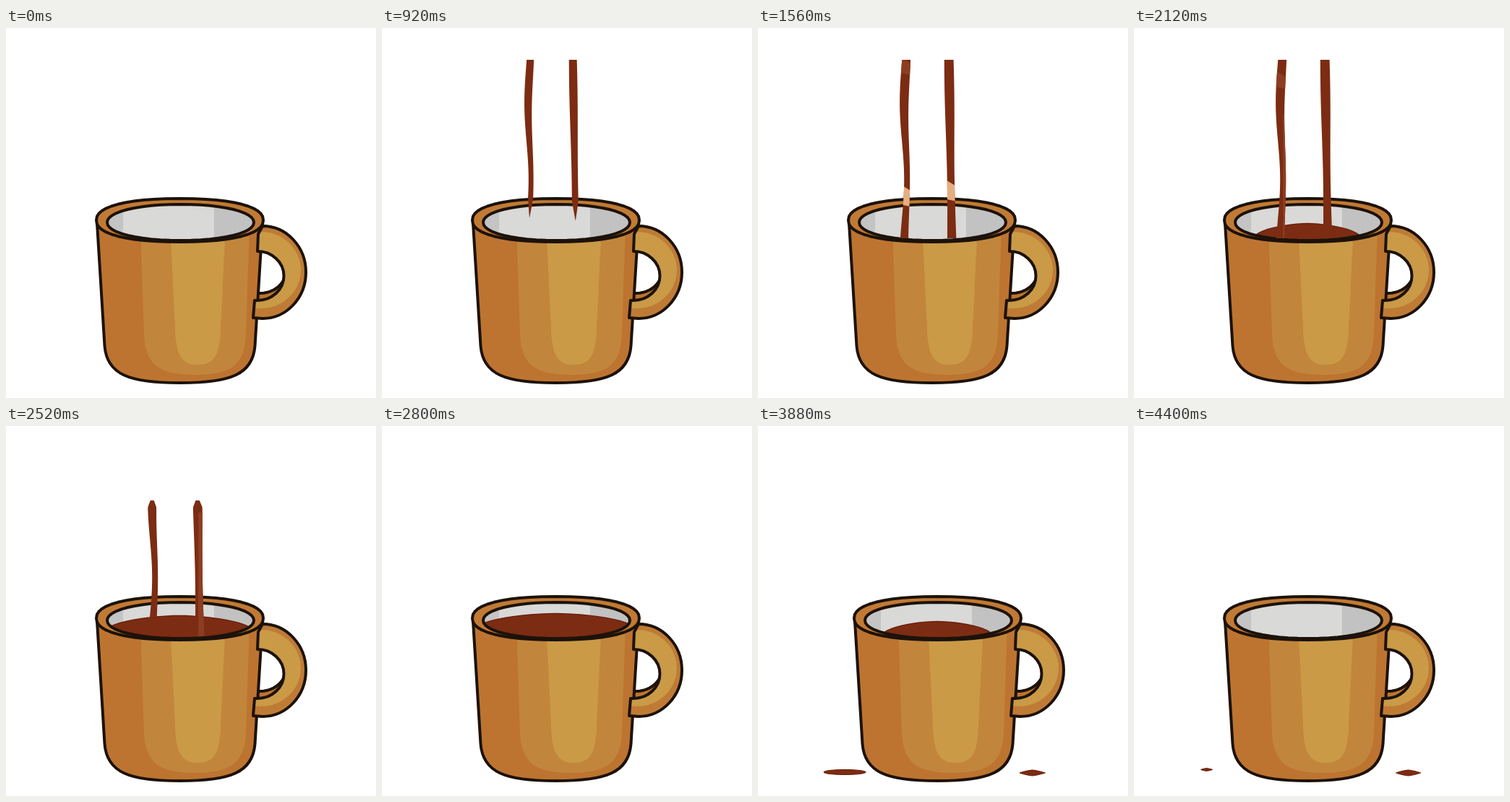
Recreate the animation shown at these times as an HTML page with a canvas. Size 512 by 512 pixels, loop 4840 ms.

```html
<!DOCTYPE html>
<html lang="en">
<head>
<meta charset="utf-8">
<title>Coffee mug</title>
<style>
html, body { margin: 0; width: 100%; height: 100%; overflow: hidden; background: #fff; }
canvas { display: block; width: 100vw; height: 100vh; }
</style>
</head>
<body>
<canvas width="512" height="512"></canvas>
<script>
const LOOP = 4840;
const ctx = document.querySelector('canvas').getContext('2d');
const INK = '#1c120a', DARK = '#bd7430', MID = '#c2853c', LIGHT = '#ca9a47';
const COFFEE = '#7c2c12', COFFEE_EDGE = '#691c0a', COFFEE_LIT = '#8c3e22', GLEAM = '#e6ae80';
const POUR_TOP = 44, POUR_END = 291;

// Superellipse: n = 1 is a diamond, 2 an ellipse, more is boxier
function oval(x, y, rx, ry, n = 2) {
  const path = new Path2D(), steps = 48;
  const bend = v => Math.sign(v) * Math.abs(v) ** (2 / n);
  for (let i = 0; i < steps; i++) {
    const a = i / steps * 2 * Math.PI;
    path.lineTo(x + rx * bend(Math.cos(a)), y + ry * bend(Math.sin(a)));
  }
  path.closePath();
  return path;
}

// Tapered wall with a rounded floor
function tub(left, right, taper, corner, bottom) {
  const path = new Path2D(), mid = (left + right) / 2;
  const half = mid - left - taper, shoulder = corner + (bottom - corner) * 0.77;
  path.moveTo(left, 270);
  path.lineTo(mid - half, corner);
  path.bezierCurveTo(mid - half * 0.97, shoulder, mid - half * 0.68, bottom, mid, bottom);
  path.bezierCurveTo(mid + half * 0.68, bottom, mid + half * 0.97, shoulder, mid + half, corner);
  path.lineTo(right, 270);
  return path;
}

const body = tub(126, 355, 10.5, 440, 491);
const midBand = tub(186, 337, 5, 425, 480);
const lightBand = tub(227, 304, 7, 415, 466);
const rim = oval(240.5, 266, 115.5, 30, 2.3);
const inner = oval(241.5, 269, 101.5, 25, 2.1);

const sideView = {
  place: [1, 0, 0, 1, 0, 0], front: true,
  handle: { x: 355, y: 338, inset: -7, holeX: 4, holeY: -10 }
};
const rightView = { ...sideView, place: [1, 0, 0, 1, 8, 0] };
const turnedView = {
  place: [1.017, 0, 0, 1, -24, -2], front: false,
  handle: { x: 351, y: 327, inset: 0, holeX: -13, holeY: -15 }
};

function paint(path, color) {
  ctx.fillStyle = color;
  ctx.fill(path);
}

function outline(path, width = 4, color = INK) {
  ctx.lineWidth = width;
  ctx.strokeStyle = color;
  ctx.stroke(path);
}

function clipped(path, draw) {
  ctx.save();
  ctx.clip(path);
  draw();
  ctx.restore();
}

function band(color, x, y, w, h) {
  ctx.fillStyle = color;
  ctx.fillRect(x, y, w, h);
}

function drawHandleHole({ x, y, inset, holeX, holeY }) {
  const inside = oval(x + inset, y + 5, 36.5, 34);
  const hole = oval(x + inset + holeX, y + 5 + holeY, 36.5, 34);
  paint(inside, DARK);
  clipped(inside, () => {
    paint(hole, '#fff');
    outline(hole);
  });
}

function drawHandleRing({ x, y, inset }) {
  const ring = new Path2D(), quarter = Math.PI / 2;
  ring.ellipse(x, y, 60, 64, 0, -quarter, quarter);
  ring.lineTo(x - 13, y + 63);
  ring.lineTo(x - 11, y + 39);
  ring.ellipse(x + inset, y + 5, 36.5, 34, 0, quarter, -quarter, true);
  ring.lineTo(x - 6, y - 53);
  ring.closePath();
  paint(ring, '#bf7b36');
  clipped(ring, () => paint(oval(x - 2, y - 3, 55, 53), LIGHT));
  outline(ring);
}

function drawCoffee({ top, reach }) {
  const surface = oval(240, top + 18, reach, 18, 1.7);
  surface.rect(240 - reach, top + 18, reach * 2, 30);
  clipped(inner, () => {
    outline(surface, 2.5, COFFEE_EDGE);
    paint(surface, COFFEE);
  });
}

function drawMug(view, coffee, pour) {
  ctx.save();
  ctx.transform(...view.place);
  drawHandleHole(view.handle);
  if (!view.front) drawHandleRing(view.handle);
  paint(body, DARK);
  paint(midBand, MID);
  paint(lightBand, LIGHT);
  outline(body);
  if (view.front) drawHandleRing(view.handle);
  paint(rim, '#c17a34');
  outline(rim);
  paint(inner, '#d9d9d8');
  clipped(inner, () => {
    band('#c4c4c4', 130, 240, 32, 60);
    band('#c2c2c2', 288, 240, 60, 60);
  });
  if (coffee) drawCoffee(coffee);
  outline(inner);
  if (pour) pour();
  ctx.restore();
}

// A ribbon that sways and thins along its length
function streamPath({ x, drift, sway, width, swell }, top, tip, falling, ending) {
  const path = new Path2D(), back = [];
  const wave = (y, period) => 2 * Math.PI * y / period;
  for (let y = top; y < tip + 3; y += 3) {
    const at = Math.min(y, tip);
    const center = x + drift * (at - 45) + sway * Math.sin(wave(at - 160, 200));
    let half = (width + swell * Math.cos(wave(at - 80, 260))) / 2;
    if (falling) half *= 0.85 * Math.min(1, (tip - at) / 28);
    if (ending) half *= Math.min(1, 0.4 + (at - top) / 16);
    path.lineTo(center - half, at);
    back.unshift([center + half, at]);
  }
  back.forEach(p => path.lineTo(...p));
  path.closePath();
  return path;
}

function slantedPatch(x, y, height, color) {
  paint(new Path2D(`M${x - 10} ${y - 6}L${x + 10} ${y + 6}V${y + height}L${x - 10} ${y + height - 4}Z`), color);
}

const leftStream = { x: 204.2, drift: 0, sway: 2, width: 10.3, swell: 2.3, lead: 0 };
const rightStream = { x: 264.2, drift: 0.016, sway: 0, width: 11.8, swell: 1.6, lead: 4 };

function drawStreams(t, coffee) {
  const falling = t < 1000, ending = t > 2440;
  const fade = (t - 2440) / 80;
  const top = ending ? 45 + 50 * fade + 8 * fade * fade : POUR_TOP;
  for (const stream of [leftStream, rightStream]) {
    const isLeft = stream === leftStream;
    const floor = isLeft && t > 2200 ? coffee.top + 4 : POUR_END;
    const tip = Math.min(floor, 78 + stream.lead + (t - 520) * 0.4625);
    if (tip <= top) continue;
    const path = streamPath(stream, top, tip, falling, ending);
    paint(path, COFFEE);
    clipped(path, () => {
      const x = stream.x + 2;
      if (t >= 1080 && t <= 1640) slantedPatch(x, 222 - stream.lead * 2 + (t - 1560) * 0.46, 26, GLEAM);
      if (isLeft && t >= 1560 && !ending) slantedPatch(x, 46 + (t - 1560) * 0.035, 20, COFFEE_LIT);
      if (t > 1640 && isLeft === t <= 2200) band(COFFEE_LIT, x, 120, 12, POUR_END - 120);
    });
  }
}

function coffeeLevel(t) {
  const k = Math.min(1, (t - 1600) / 1200);
  return { top: 286 - 26 * (1 - (1 - k) ** 1.5), reach: 50 + 55 * k * k * (3 - 2 * k) };
}

function drawPuddle(x, y, rx, ry, n) {
  const puddle = oval(x, y, rx, ry, n);
  paint(puddle, COFFEE);
  outline(puddle, 1, COFFEE_EDGE);
}

// Poses are held on short steps, with two longer rests
function stepTime(t) {
  if (t >= 2120 && t < 2200) return 2120;
  if (t >= 2680 && t < 2800) return 2680;
  const step = t < 1560 ? 80 : 40;
  return 520 + Math.floor((t - 520) / step) * step;
}

function render(time) {
  ctx.fillStyle = '#fff';
  ctx.fillRect(0, 0, 512, 512);
  ctx.lineJoin = ctx.lineCap = 'round';
  if (time < 520) {
    drawMug(sideView);
  } else if (time < 3400) {
    const t = stepTime(time);
    const coffee = t >= 1600 ? coffeeLevel(t) : null;
    drawMug(sideView, coffee, t < 2800 ? () => drawStreams(t, coffee) : null);
  } else if (time < 3880) {
    drawMug(turnedView, { top: 265.5, reach: 104 });
    drawPuddle(357, 483, 39.5, 4.5);
  } else if (time < 4400) {
    drawPuddle(120, 479, 29, 3.5);
    drawPuddle(379.5, 480, 17.5, 4, 1.2);
    drawMug(rightView, { top: 271, reach: 75 });
  } else {
    drawMug(sideView);
    drawPuddle(100.5, 475.5, 8, 2, 1.2);
    drawPuddle(379.5, 480, 17, 4, 1.2);
  }
}

const start = performance.now();
function tick() {
  render((performance.now() - start) % LOOP);
  requestAnimationFrame(tick);
}
tick();
</script>
</body>
</html>
```
